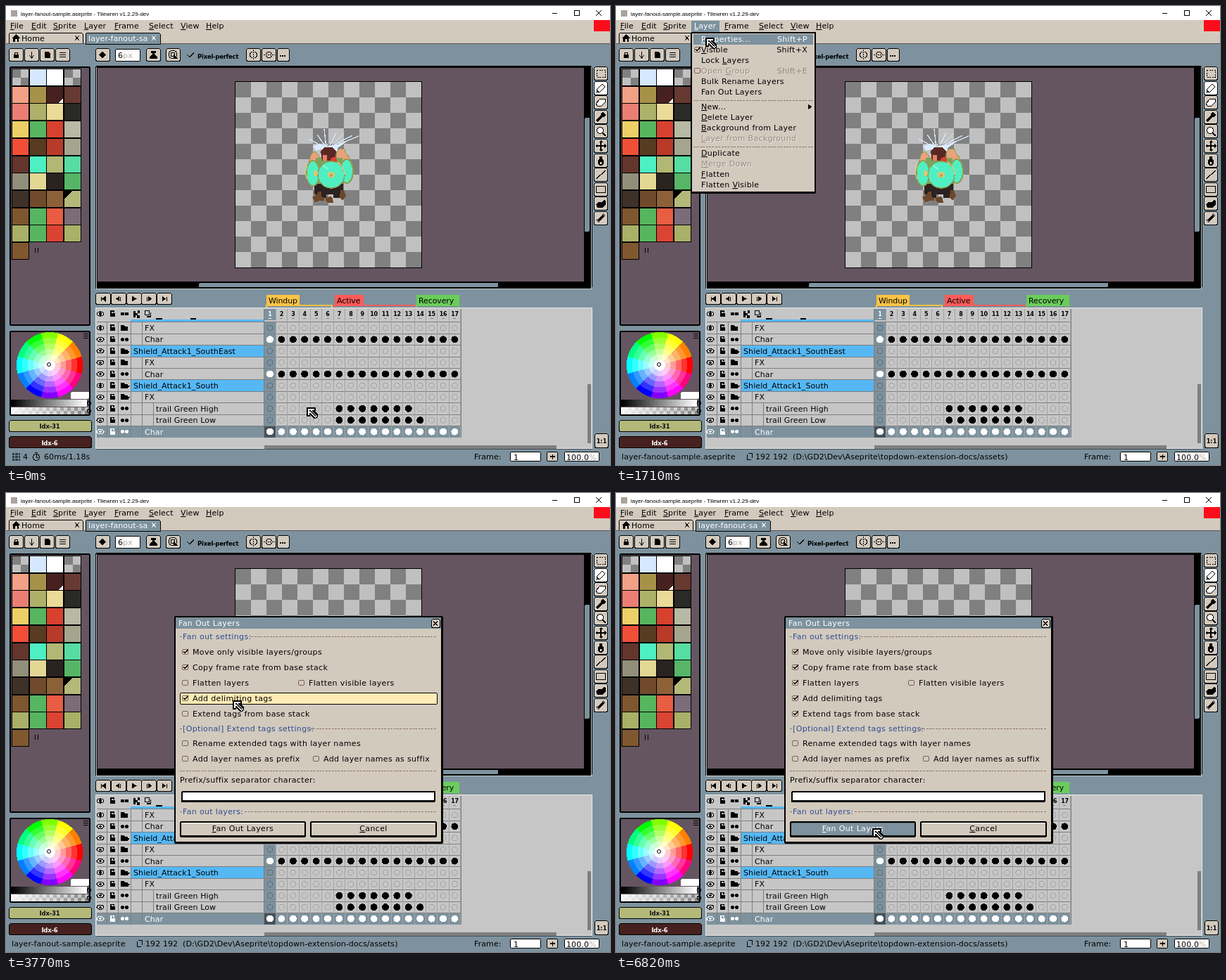
An HTML page that plays this animation: 858 by 653 pixels, repeating every 8 s.

```html
<!DOCTYPE html>
<html lang="en">
<head>
<meta charset="utf-8">
<title>Layer fan out</title>
<style>
  html, body { margin: 0; width: 100%; height: 100%; overflow: hidden; background: #7d929e; }
  svg { display: block; shape-rendering: crispEdges; cursor: none; }
  text { font: 11px 'DejaVu Sans', 'Noto Sans', sans-serif; letter-spacing: .1px; white-space: pre; }
  .u { text-decoration: underline; }
</style>
</head>
<body>
<svg id="stage" width="858" height="653" viewBox="0 0 858 653">
  <g id="base"></g>
  <g id="live"></g>
  <g id="cursor">
    <path d="M0 0H13V5H11L16 10V13L13 16H10L5 11V13H0Z"/>
    <path fill="#fff" d="M2 2H11V3.5H7.5V5L14.5 12V13L13 14.5H12L5 7.5H3.5V11H2Z"/>
    <path d="M3.500 3.500H6V5L13 12L12 13L5 6H3.500Z"/>
  </g>
</svg>
<script>
const FACE = '#d3cabe', BLUE = '#7d929e', PURPLE = '#655561', HOT = '#ffebb6', GRAY = '#c6c6c6',
      GRID = '#7f7f7f', FAINT = '#a3a3a3', DIM = '#978a82', GROUP = '#55b8f5', LINK = '#2c4c91', EDGE = '#8d7468';

// ---- drawing helpers ----
const rect = (x, y, w, h, fill, more = '') =>
  `<rect x="${x}" y="${y}" width="${w}" height="${h}" fill="${fill}" ${more}/>`;
const box = (x, y, w, h, fill, r = 2) =>
  rect(x + .5, y + .5, w - 1, h - 1, fill, `stroke="#000" rx="${r}"`);
const path = (d, fill = '#000', more = '') => `<path d="${d}" fill="${fill}" ${more}/>`;
const line = (d, color = '#000', w = 1, more = '') =>
  path(d, 'none', `stroke="${color}" stroke-width="${w}" ${more}`);
const dot = (x, y, r, fill = '#000', more = '') =>
  `<circle cx="${x}" cy="${y}" r="${r}" fill="${fill}" ${more}/>`;
const oval = (x, y, rx, ry, fill, more = '') =>
  `<ellipse cx="${x}" cy="${y}" rx="${rx}" ry="${ry}" fill="${fill}" ${more}/>`;
const at = (x, y, body) => `<g transform="translate(${x} ${y})">${body}</g>`;
// y is the middle of the line of text
const text = (x, y, s, fill = '#000', style = '', anchor = 'start') =>
  `<text x="${x}" y="${y + 4}" fill="${fill}" text-anchor="${anchor}" style="${style}">${s}</text>`;
const mnemonic = (s, i = 0) => `${s.slice(0, i)}<tspan class="u">${s[i]}</tspan>${s.slice(i + 1)}`;
const times = (n, f) => Array.from({ length: n }, (_, i) => f(i)).join('');
const checker = (x, y, w, h, s) => rect(x, y, w, h, '#c0c0c0') +
  times(Math.ceil(w / s), c => times(Math.ceil(h / s), r => (r + c) % 2 ? ''
    : rect(x + c * s, y + r * s, Math.min(s, w - c * s), Math.min(s, h - r * s), '#808080')));
const panel = (x, y, w, h) => rect(x, y, w, h, '#000', 'rx="3"') + rect(x + 2, y + 2, w - 4, h - 4, PURPLE);

// ---- window top ----
function topBar() {
  const menus = [['File', 6], ['Edit', 36], ['Sprite', 67], ['Layer', 111],
                 ['Frame', 154], ['Select', 203], ['View', 248], ['Help', 284]];
  return rect(0, 0, 858, 20, '#fff') + rect(7, 6, 9, 9, '#aaa39b') +
    text(21, 9.5, 'layer-fanout-sample.aseprite - Tilewren v1.2.29-dev', '#000',
      "font:8px 'Liberation Sans',Arial,sans-serif;letter-spacing:0") +
    line('M776 10.5H783M807.5 6.5H814.5V13.5H807.5ZM838 6L846 14M846 6L838 14') +
    rect(0, 20, 858, 33, FACE) + rect(835, 20, 23, 16, '#fb0d1b') +
    menus.map(([s, x]) => text(x, 28, mnemonic(s))).join('') +
    path('M4 53V40L6 38H107L109 40V53Z', FACE, 'stroke="#000"') +
    path('M113 54V40L115 38H217L219 40V54Z', BLUE, 'stroke="#000"') +
    line('M0 53.5H113M219 53.5H858', '#5b5358') +
    path('M8 46L14 40L20 46H18V51H15.500V47H12.500V51H10V46Z') +
    text(22, 46, 'Home') + text(117, 46, 'layer-fanout-sa', '#fff') + rect(203, 39, 14, 14, BLUE) +
    line('M98 42L104 49M104 42L98 49') + line('M207 42L213 49M213 42L207 49', '#fff');
}

function toolRow() {
  const b = (x, w = 21) => box(x, 60, w, 19, FACE, 3);
  return [4, 26, 48, 70, 127, 199, 227, 341, 363].map(x => b(x)).join('') + b(385, 18) +
    path('M11 69H18V74H11Z') + line('M12.500 69V66.500H16.500V69') +
    line('M36.500 65V73M33 70L36.500 74L40 70') + path('M55 65H60L63 68V74H55Z') +
    line('M76 66.500H85M76 69.500H85M76 72.500H85') +
    path('M137 65L142 69.500L137 74L132 69.500Z') +
    box(155, 61, 36, 18, '#fff') + text(159, 70, '6<tspan fill="#b8aca0">px</tspan>') +
    path('M206 64H213V67H211V69L215 72V75H204V72L208 69V67H206Z') +
    dot(237, 69, 6, 'none', 'stroke="#000"') + dot(237, 69, 3, 'none', 'stroke="#000"') +
    path('M238 69L244 75H238Z') +
    line('M257 69L261 73L267 66', '#000', 1.3) +
    text(272, 71, 'Pixel-perfect', '#000', 'font-size:8.500px;font-weight:bold;letter-spacing:-.250px') +
    line('M351.500 62V77', '#000', 1, 'stroke-dasharray="2 1"') + line('M350 65.500H348.500L346.500 68V71L348.500 73.500H350M353 65.500H354.500L356.500 68V71L354.500 73.500H353') +
    line('M366 69.500H382', '#000', 1, 'stroke-dasharray="2 1"') + line('M369.500 68L371.500 65.500H375.500L377.500 68M369.500 71L371.500 73.500H375.500L377.500 71') +
    [389, 392, 395].map(x => rect(x, 70, 1.5, 1.5, '#000')).join('');
}

// ---- left side ----
function palette() {
  const colors = ('. d6e8ff ffffff . f3a086 a69149 47211f 663931 ea7e75 adb169 eadb98 2a2a28 ' +
    'ecd067 57b560 d9412f b8b9a4 f04e37 573c21 b83a28 a4a58c 64352c 4ef0c3 b2b773 57dca2 ' +
    '918e79 e3d794 2a2320 56b567 3e3128 714a2c 8d6138 b4b97a 7e5630 57b560 e95d42 7c6b78 ' +
    'a9b067 57b560 db4332 a9b067 80572f').split(' ');
  const cells = colors.map((c, i) => {
    const x = 8 + i % 4 * 24.6, y = 89 + Math.floor(i / 4) * 24.7;
    return rect(x, y, 25, 25, '#000') +
      (c === '.' ? checker(x + 1, y + 1, 23, 23, 12) : rect(x + 1, y + 1, 23, 23, '#' + c));
  }).join('');
  return panel(5, 86, 115, 369) + cells + path('M83 262H95L83 274Z') +
    path('M81 131V138H75Z', '#fff') + line('M41.500 344V351M45.500 344V351');
}

function wheel() {
  const R = 47, rings = 6, steps = 12;
  const point = (r, a) => `${(62 + r * Math.cos(a)).toFixed(1)} ${(511 - r * Math.sin(a)).toFixed(1)}`;
  let s = panel(5, 462, 115, 121);
  for (let k = rings; k > 0; k--) for (let i = 0; i < steps; i++) {
    const a = (i - .5) / steps * 2 * Math.PI, b = (i + .5) / steps * 2 * Math.PI, r = R * k / rings;
    s += path(`M62 511L${point(r, a)}A${r} ${r} 0 0 0 ${point(r, b)}Z`,
      `hsl(${i * 360 / steps} 100% ${100 - 50 * (k - 1) / (rings - 1)}%)`);
  }
  s += dot(61, 510, 2.5, '#fff', 'stroke="#000" shape-rendering="auto"');
  s += line('M110 466.500H117M110 469.500H117M110 472.500H117');
  s += rect(92, 549, 26, 10, '#fff', 'rx="2"');
  s += times(27, i => rect(7 + i * 4, 560, 4, 10, `hsl(0 0% ${i / 26 * 100}%)`));
  s += checker(7, 571, 110, 10, 5) + times(27, i => rect(7 + i * 4, 571, 4, 10, '#fff', `opacity="${.9 - i / 30}"`));
  s += dot(118, 565, 2.5, 'none', 'stroke="#000"') + dot(118, 576, 2.5, 'none', 'stroke="#000"');
  const label = 'font-size:8.500px;font-weight:bold;letter-spacing:-.200px';
  return s + box(4, 589, 118, 17, '#b4b97a', 3) + text(62, 597, 'Idx-31', '#111', label, 'middle') +
    box(4, 612, 118, 17, '#47211f', 3) + text(62, 621, 'Idx-6', '#fff', label, 'middle');
}

// ---- middle ----
function sprite() {
  const mint = '#50efc2', olive = '#8e9c50', skin = '#eaa27a', gold = '#dcc678';
  return line('M455 203L452 175M456 203L430 189M456 203L442 183M458 203L469 180M458 203L480 181M458 203L501 185M458 202L492 184', '#d6e8ff', 1.3) +
    path('M436 199L446 196L456 200L470 197L484 193L470 203L476 208L464 206L458 209L448 204L440 206Z', '#dceaff') +
    path('M429 226L434 210L439 207L446 216L444 224L432 230Z', skin, `stroke="${olive}"`) +
    path('M469 209L473 203L481 204L483 210L489 217L487 224L470 220Z', skin, `stroke="${olive}"`) +
    rect(440, 216, 38, 40, '#7ca25c') +
    path('M438 253H479V268H474V273H465V268H455V273H444L438 266Z', '#2c221f') +
    path('M435 272L441 269L444 264H448V271L452 273V277H446L439 279Z', '#6d472a') +
    path('M454 273L461 271L464 274L465 280H458L454 277ZM475 262H480L483 270L478 277L474 272Z', '#6d472a') +
    path('M447 206L453 201H463L469 207L467 220H449Z', '#5a2822') + path('M450 212H456V220H450Z', '#e98068') +
    path('M462 216L468 214L471 222H460Z', '#d9412f') +
    oval(436, 238, 9.5, 18, mint, `stroke="${olive}" stroke-width="2"`) +
    oval(484, 235, 9, 17, mint, `stroke="${olive}" stroke-width="2"`) +
    oval(462, 240, 19, 19, mint, `stroke="${olive}" stroke-width="1.5"`) +
    line('M470 222A20 19 0 0 1 481 240', gold, 1.5) + line('M428 224L425 238L428 246', gold, 1.5) +
    oval(440, 238, 3, 4, gold) + oval(462, 240, 5, 4.5, gold) + dot(462, 241, 2, '#b8a04e') +
    line('M450 227L458 232', '#8cf8dc', 2);
}

function editor() {
  return rect(126.5, 85, 706, 318, '#000', 'rx="3"') + line('M128.500 87V402.500H831.500V87', '#c9cfd2') +
    rect(130, 88, 691, 304, PURPLE) +
    rect(822, 159, 7, 162, BLUE, 'rx="2"') + rect(274, 394, 425, 6, BLUE, 'rx="2"') +
    rect(325, 107, 266, 266, '#000') + checker(326, 108, 264, 264, 22) + sprite();
}

function tools() {
  const icons = [
    line('M-6 -5H6V5H-6Z', '#000', 1, 'stroke-dasharray="2 1.500"'),
    path('M-6 6L-5 1L2 -6L6 -2L-1 5Z', '#fff', 'stroke="#000"') + path('M-6 6V2L-2 6Z'),
    path('M-7 2L-1 -5H6V0L1 5H-5Z', '#fff', 'stroke="#000"'),
    line('M-6 6L2 -2', '#000', 3) + path('M-1 -4L3 -7L7 -3L4 1Z'),
    dot(-1, -1, 4.5, '#fff', 'stroke="#000"') + line('M2 2L7 7', '#000', 2.5),
    line('M0 -7V7M-7 0H7', '#000', 1.5) + path('M-3 -5H3L0 -8ZM-3 5H3L0 8ZM-5 -3V3L-8 0ZM5 -3V3L8 0Z'),
    oval(0, 2, 4.5, 5, '#000') + path('M-2 -6H2V-2H-2Z') + rect(-1, 2, 2, 3, '#fff'),
    line('M-7 6L7 -6', '#000', 1.3),
    line('M-6.500 -4.500H6.500V4.500H-6.500Z'),
    path('M-7 1L-3 -2H2L5 -6L7 -3V2L2 6H-5Z'),
    line('M-5 5L4 -4', '#000', 4) + line('M3 -6L6 -3M-6 2L-2 6', '#655561', 1.5)
  ];
  return icons.map((icon, i) => {
    const y = Math.round(86 + i * 20.6);
    return box(835, y, 20, 20, i === 1 ? '#fff' : FACE, 3) + at(845, y + 10, icon);
  }).join('');
}

// ---- timeline ----
const COL = 16.4, colX = i => 375 + i * COL;
const eye = (y, c) => oval(134, y, 5, 3, 'none', `stroke="${c}" stroke-width="1.200"`) + dot(134, y, 1.7, c);
const lock = (y, c) => rect(147.5, y - 1, 7, 5, c) + line(`M149 ${y - 1}V${y - 4}H153V${y - 2}`, c, 1.3);
const pair = (y, c) => dot(165.5, y, 2.5, c) + dot(171.5, y, 2.5, c);

function rowOf([name, indent, kind], i) {
  const y = 458 + i * COL, top = y - COL / 2, sel = i === 9, ink = sel ? '#fff' : '#000';
  const keyed = kind === 'key' || kind === 'trail';
  let s = rect(129, top, 517, COL, sel ? BLUE : GRAY) +
    (kind === 'group' ? rect(177, top, 189, COL, GROUP) : '') +
    rect(367, top, COL, COL, sel ? '#45535c' : BLUE);
  s += line(`M129 ${top}H646`, GRID) +
    line(`M143.500 ${top}v${COL}M159.500 ${top}v${COL}M177.500 ${top}v${COL}` +
      (indent > 181 ? `M193.500 ${top}v${COL}` : '') + (indent > 200 ? `M209.500 ${top}v${COL}` : ''), GRID);
  s += eye(y, ink) + lock(y, ink) + (keyed ? pair(y, ink)
    : path(`M163 ${y + 4}V${y - 4}H168L169 ${y - 2}H173V${y + 4}Z`) +
      (name === 'FX' && i !== 6 ? '' : path(`M163 ${y + 4}L166 ${y}H176L173 ${y + 4}Z`)));
  s += text(indent, y, name, ink);
  const last = name.endsWith('High') ? 12 : 13;
  return s + times(17, c => {
    const full = kind === 'key' || kind === 'trail' && c >= 6 && c <= last;
    return line(`M${colX(c) + 8.2} ${top}v${COL}`, FAINT) +
      (full ? dot(colX(c), y, 5, sel || c === 0 ? '#fff' : '#000')
        : dot(colX(c), y, 4, 'none', `stroke="${c ? FAINT : '#5c6d78'}"`));
  });
}

function timeline() {
  const rows = [['FX', 197], ['Char', 197, 'key'], ['Shield_Attack1_SouthEast', 181, 'group'], ['FX', 197],
    ['Char', 197, 'key'], ['Shield_Attack1_South', 181, 'group'], ['FX', 197],
    ['trail Green High', 213, 'trail'], ['trail Green Low', 213, 'trail'], ['Char', 197, 'key']];
  const tags = [['Windup', 370, 47, 463, '#fbc444'], ['Active', 467, 41, 580, '#fe5b59'], ['Recovery', 583, 61, 643, '#6acd5b']];
  const play = ['M-3 -3V3M3 -3L-1 0L3 3Z', 'M1 -3V3L-3 0ZM3 -3V3', 'M-2 -3L3 0L-2 3Z', 'M-1 -3L3 0L-1 3ZM-3 -3V3', 'M-3 -3L1 0L-3 3ZM3 -3V3'];
  return play.map((d, i) => box(127 + Math.round(i * 21.8), 408, 22, 17, FACE, 3) +
      at(138 + i * 21.8, 416.5, path(d, '#000', 'stroke="#000"'))).join('') +
    tags.map(([s, x, w, end, c]) => line(`M${x} 429V426H${end}V429`, c, 2) + rect(x, 411, w, 15, c) +
      text(x + 3, 418.5, s, '#000', 'letter-spacing:-.100px')).join('') +
    rect(127, 429, 705, 201, GRAY) + line('M127 429.500H832.500V629.500H127.500V430', '#e8e8e8') +
    line('M128 630.500H832', '#42505a') + rect(367, 431, COL, 16, BLUE) +
    eye(438, '#000') + lock(438, '#000') + pair(438, '#000') +
    path('M181 434H184V437H187V433H190V437H187V440H190V444H186V440H184V443H181Z') +
    line('M197.500 433.500H203.500V439.500H197.500ZM200 442H205.500V436', '#000', 1.3) +
    times(17, i => text(colX(i), 437, i + 1, i ? '#000' : '#fff',
      'font-size:8px;font-weight:bold;letter-spacing:-.300px', 'middle') +
      rect(colX(i) - 2, 444, 4, 1, i ? GRID : '#fff') +
      line(`M${colX(i) + 8.2} 431v17`, FAINT)) +
    rows.map(rowOf).join('') + rect(177, 446, 189, 3, GROUP) +
    rect(213, 444, 9, 2, '#000') + rect(262, 444, 8, 2, '#000') +
    line('M366.500 431V614M646 431V614', GRID) +
    rect(826, 538, 5, 84, GRID) + rect(367, 625, 415, 5, GRID);
}

function bottom() {
  return text(665, 641, 'Frame:') + box(716, 634, 44, 14, '#fff') + text(721, 641.5, '1') +
    box(768, 634, 16, 14, FACE) + line('M773 641H780M776.500 637.500V644.500', '#000', 1.5) +
    box(793, 634, 50, 14, '#fff') + text(796, 641.5, '100.0<tspan fill="#b8aca0">%</tspan>') +
    box(836, 608, 20, 21, FACE, 3) + text(846, 618, '1:1', '#000', 'font-size:8px;font-weight:bold', 'middle');
}

// ---- changing parts ----
function status(early) {
  if (early) return rect(9, 636, 11, 11, '#2d3940') +
    line('M12 636V647M17 636V647M9 639.500H20M9 643.500H20', BLUE) + text(24, 641, '4') +
    dot(43, 642, 4.5, 'none', 'stroke="#000" stroke-width="1.300"') + line('M43 638V642H46M41 635H45') +
    text(54, 641, '60ms/1.18s');
  return text(8, 641, 'layer-fanout-sample.aseprite') +
    line('M186 638V645H192M188 636.500H193.500V643') + text(198, 641, '192 192') +
    text(251, 641, String.raw`(D:\GD2\Dev\Aseprite\topdown-extension-docs/assets)`);
}

const tick = (x, y, on) => rect(x + .5, y - 3.5, 8, 7, 'none', 'rx="2" stroke="#7a5f55"') +
  (on ? line(`M${x + 2} ${y - 1}L${x + 4} ${y + 2}L${x + 9} ${y - 4}`, '#000', 1.3) : '');
const dashes = (y, x0, x1) => line(`M${x0} ${y + .5}H${x1}`, EDGE, 1, 'stroke-dasharray="3 1.400"');

function layerMenu(x, y) {
  const items = [['Properties...', 47, 'Shift+P'], ['Visible', 62, 'Shift+X'], ['Lock Layers', 77],
    ['Open Group', 92, 'Shift+E', 1], ['Bulk Rename Layers', 107], ['Fan Out Layers', 122], ['New...', 143],
    ['Delete Layer', 158], ['Background from Layer', 173], ['Layer from Background', 188, '', 1],
    ['Duplicate', 209], ['Merge Down', 224, '', 1], ['Flatten', 239], ['Flatten Visible', 254]];
  const marks = { 'Flatten Visible': 8, 'Bulk Rename Layers': -1, 'Fan Out Layers': -1, 'Lock Layers': 5, 'Open Group': 5 };
  const sp = 'letter-spacing:.300px';
  return rect(107, 21, 40, 17, BLUE) + text(111, 28, mnemonic('Layer'), '#fff') +
    rect(106, 37, 178, 230, '#000', 'rx="2"') + rect(108, 38.5, 174, 225, FACE) +
    items.map(([s, cy, key, off]) => {
      const hot = !off && x > 108 && x < 282 && Math.abs(y - cy) < 7.5;
      const ink = off ? DIM : hot ? '#fff' : '#000', m = marks[s] ?? 0;
      const label = m < 0 ? s : mnemonic(s, m);
      return (hot ? rect(110, cy - 7, 170, 15, BLUE) : '') +
        (off ? text(122, cy + 1, s, '#efe8df', sp) : '') + text(121, cy, label, ink, sp) +
        (key ? text(272, cy, key, ink, sp, 'end') : '');
    }).join('') +
    tick(111, 62, true) + tick(111, 92, false) + path('M273 139.500L278 143.500L273 147.500Z') +
    dashes(134, 110, 280) + dashes(200, 110, 280);
}

// left, width, middle, label, time it gets checked
const CHECKS = [
  [247, 366, 226, 'Move only visible layers/groups', 0], [247, 366, 248, 'Copy frame rate from base stack', 0],
  [247, 160, 270, 'Flatten layers', 5260], [412, 201, 270, 'Flatten visible layers'],
  [247, 366, 292, 'Add delimiting tags', 3570], [247, 366, 314, 'Extend tags from base stack', 4390],
  [247, 366, 356, 'Rename extended tags with layer names'],
  [247, 182, 378, 'Add layer names as prefix'], [433, 180, 378, 'Add layer names as suffix']];

function dialog(t, x, y) {
  const sp = 'letter-spacing:.350px';
  const heading = (cy, s, w) => dashes(cy, 247, 611) + rect(251, cy - 6, w, 12, FACE) + text(251, cy, s, LINK, sp);
  const focus = t < 3570 ? -1 : t < 4390 ? 4 : t < 5260 ? 5 : t < 6820 ? 2 : -1;
  const inside = (l, w, top, h) => x >= l && x < l + w && y >= top && y < top + h;
  const button = (l, w, s, i, down) => {
    const fill = down ? BLUE : inside(l, w, 468, 22) ? HOT : FACE;
    return rect(l, 467, w, 23, '#000', 'rx="3"') + rect(l + 2, 469, w - 4, 18, fill, 'rx="1"') +
      line(`M${l + 2} 469.500H${l + w - 2}`, down ? '#5e717c' : '#fff') +
      text(l + w / 2, 477, mnemonic(s, i), down ? '#fff' : '#000', sp, 'middle');
  };
  return rect(239, 175, 382, 324, '#000', 'rx="3"') + rect(241, 177, 377, 319, FACE) +
    rect(241, 177, 377, 16, BLUE) + text(245, 185, 'Fan Out Layers', '#fff', sp) +
    box(604, 179, 13, 13, FACE, 3) + line('M607 182L613 189M613 182L607 189', '#000', 1.3) +
    heading(204, 'Fan out settings:', 96) + heading(335, '[Optional] Extend tags settings:', 180) +
    heading(453, 'Fan out layers:', 87) + dashes(395, 247, 611) +
    CHECKS.map(([l, w, cy, s, since], i) => {
      const hot = inside(l, w, cy - 8, 17), focused = i === focus;
      const back = focused ? box(l, cy - 8, w, 17, hot ? HOT : '#c3bfbf') : hot ? rect(l, cy - 8, w, 16, HOT) : '';
      return back + tick(l + 3, cy, t >= since) + text(l + 18, cy, s, '#000', sp);
    }).join('') +
    text(247, 408, 'Prefix/suffix separator character:', '#000', sp) +
    rect(249, 424, 361, 16, '#000', 'rx="2"') + rect(251, 426, 357, 11, '#fff') +
    button(247, 179, 'Fan Out Layers', 0, t >= 6820) + button(432, 180, 'Cancel', 0, false);
}

// ---- pointer: start, end, steps, x, y ----
const MOVES = [[200, 960, 12, 121, 39], [1030, 1110, 2, 116, 29], [1570, 2270, 11, 176, 118],
  [2740, 2950, 4, 248, 215], [3020, 3440, 7, 322, 294], [3770, 3770, 1, 322, 295],
  [3840, 4120, 5, 324, 319], [4590, 4800, 4, 322, 267], [5460, 6170, 11, 364, 477]];
const ease = p => p * p * (3 - 2 * p);

function pointer(t) {
  let x = 427, y = 571;
  for (const [start, end, n, toX, toY] of MOVES) {
    if (t < start) break;
    const step = n > 1 ? Math.floor((t - start) / (end - start) * (n - 1) + 1e-6) + 1 : 1;
    const p = ease(Math.min(1, step / n));
    x += (toX - x) * p;
    y += (toY - y) * p;
  }
  return [Math.round(x), Math.round(y)];
}

const live = document.getElementById('live'), hand = document.getElementById('cursor');
document.getElementById('base').innerHTML = rect(0, 0, 858, 653, BLUE) + topBar() + toolRow() +
  palette() + wheel() + editor() + tools() + timeline() + bottom();

let shown = '';
function draw() {
  const t = performance.now() % 8000, [x, y] = pointer(t);
  let s = status(y > 430 && t < 1000);
  if (t < 1240 && y < 38) s += rect(107, 21, 40, 17, HOT) + text(111, 28, mnemonic('Layer'));
  if (t >= 1240 && t < 2470) s += layerMenu(x, y);
  if (t >= 2470) s += dialog(t, x, y);
  if (s !== shown) live.innerHTML = shown = s;
  hand.setAttribute('transform', `translate(${x} ${y})`);
  requestAnimationFrame(draw);
}
draw();
</script>
</body>
</html>
```
